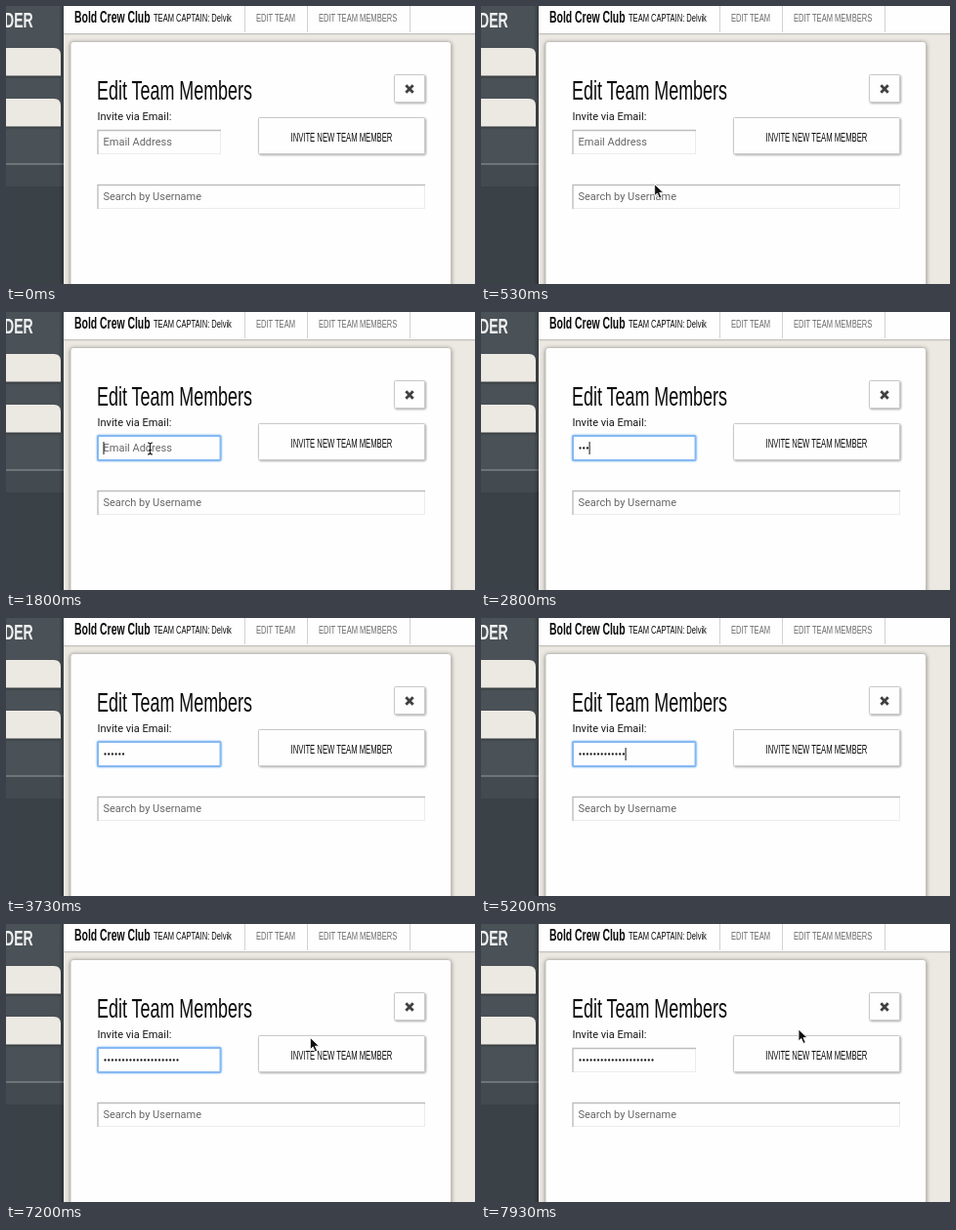
Write an HTML page that moves like this. It is 480 px wide and 285 px high and loops after 8000 ms.

```html
<!DOCTYPE html>
<html lang="en">
<head>
<meta charset="utf-8">
<title>Edit Team Members</title>
<style>
  html, body { margin: 0; width: 100%; height: 100%; overflow: hidden; background: #ece8e2; }
  svg { display: block; width: 100vw; height: 100vh; }
  text { font-family: Roboto, sans-serif; font-size: 11px; fill: #151515; white-space: pre; }
  .narrow text { font-family: "Liberation Sans", Arial, sans-serif; fill: #0c0c0c; }
  .narrow .nav { font-size: 11.8px; fill: #6c6c6c; }
  .hint { fill: #666; }
  .raised { fill: #fefefe; stroke: #c9c9c9; filter: drop-shadow(1px 1.5px 1px #0005); }
</style>
</head>
<body>
<svg viewBox="0 0 480 285">
  <defs>
    <linearGradient id="edge">
      <stop offset="0" stop-color="#0000"/>
      <stop offset="1" stop-color="#0004"/>
    </linearGradient>
  </defs>

  <!-- page and top bar -->
  <rect width="480" height="285" fill="#ece8e2"/>
  <rect x="59" y="-4" width="425" height="32" fill="#fefefe" style="filter:drop-shadow(0 .5px 1px #0008)"/>
  <path d="M244.5 0V27M308.5 0V27M413.5 0V27" stroke="#d2d2d2"/>

  <!-- sidebar -->
  <rect width="59" height="285" fill="#4a5257"/>
  <rect y="163" width="59" height="22" fill="#444b50"/>
  <rect y="185" width="59" height="100" fill="#3b4247"/>
  <path d="M0 162H59" stroke="#92989b"/>
  <rect x="54" width="5" height="285" fill="url(#edge)"/>
  <g fill="#ece8e2" style="filter:drop-shadow(0 1px 1px #0006)">
    <path d="M-2 43H49q7 0 7 7V71.5H-2z"/>
    <path d="M-2 95H49q7 0 7 7V123.5H-2z"/>
  </g>

  <!-- card -->
  <rect x="66" y="36.5" width="389.5" height="260" rx="3" fill="#fefefe" stroke="#c4c0ba"
        style="filter:drop-shadow(0 1px 2px #0006)"/>
  <rect class="raised" x="397.5" y="70.5" width="31" height="28" rx="1"/>
  <path d="M409.300 81.300l7.400 7.400m0-7.400l-7.400 7.400" stroke="#404040" stroke-width="2.800"/>
  <rect class="raised" x="258.5" y="114.5" width="170" height="37" rx="1"/>
  <g fill="#fefefe" stroke="#ececec">
    <rect x="94" y="127.5" width="125.5" height="24"/>
    <rect x="94" y="183.5" width="334.5" height="24"/>
  </g>
  <path d="M94 152V127.5H220M94 208V183.5H429" fill="none" stroke="#bdbdbd" stroke-width="1.300"/>

  <g class="narrow">
    <text transform="translate(-2 21.5) scale(.64 1)" style="font-size:22px;font-weight:bold;fill:#f1f1f1">DER</text>
    <text transform="translate(70 16.5) scale(.64 1)" style="font-size:16.300px;font-weight:bold">Bold Crew Club</text>
    <text transform="translate(151 16) scale(.64 1)" style="font-size:11.800px">TEAM CAPTAIN: Delvik</text>
    <text class="nav" transform="translate(256 15.500) scale(.64 1)">EDIT TEAM</text>
    <text class="nav" transform="translate(320 15.500) scale(.64 1)">EDIT TEAM MEMBERS</text>
    <text transform="translate(93 96.200) scale(.64 1)" style="font-size:28px">Edit Team Members</text>
    <text transform="translate(291.500 138.500) scale(.64 1)" style="font-size:12px">INVITE NEW TEAM MEMBER</text>
  </g>
  <text x="93.500" y="116.700">Invite via Email:</text>
  <text class="hint" x="99.500" y="199.200">Search by Username</text>

  <!-- email field state -->
  <rect id="focus" x="94" y="127" width="125.500" height="25" rx="1" fill="#fefefe" stroke="#84b9f2" stroke-width="2"
        style="filter:drop-shadow(0 0 1px #84b9f2)"/>
  <text id="hint" class="hint" x="99.500" y="143">Email Address</text>
  <path id="dots" stroke="#1c1c1c" stroke-width="2.300" stroke-linecap="round" stroke-dasharray="0 3.7"/>
  <path id="caret" stroke="#111" d="M0 133V146"/>

  <!-- pointer -->
  <g id="pointer">
    <circle id="ring" cx=".5" cy="1" r="16.500" fill="#fff4" stroke="#0a0a0a" stroke-width="2.200"/>
    <path id="arrow" d="M0 0V12l2.800-2.600 2.200 5 2.200-1-2.200-4.800H9z" fill="#111" stroke="#fff" stroke-width=".8"/>
    <path id="beam" d="M-2.500-5q2.500 0 2.500 2V5q0 2-2.500 2M2.500-5q-2.500 0-2.500 2M0 5q0 2 2.500 2M-1.500 2.500h3"
          fill="none" stroke="#222" stroke-width="1.100"/>
  </g>
</svg>
<script>
const LOOP = 8000, PITCH = 3.7;
const CLICK = 1470, TYPE_START = 2600, LEAVE = 6650, BLUR = 7500;
const typing = [[TYPE_START, 1], [3100, 6], [3870, 6], [5100, 13], [5300, 13], [6470, 21]];

const el = id => document.getElementById(id);
const show = (id, on) => el(id).style.display = on ? "" : "none";
const within = (t, a, b) => t >= a && t < b;
const ease = (t, a, b) => {
  const s = Math.min(1, Math.max(0, (t - a) / (b - a)));
  return s * s * (3 - 2 * s);
};
const bezier = (a, b, c, s) => (1 - s) ** 2 * a + 2 * s * (1 - s) * b + s * s * c;

function typedCount(t) {
  if (t < TYPE_START) return 0;
  for (let i = 1; i < typing.length; i++) {
    const [t0, n0] = typing[i - 1], [t1, n1] = typing[i];
    if (t < t1) return Math.floor(n0 + (n1 - n0) * (t - t0) / (t1 - t0));
  }
  return typing.at(-1)[1];
}

function pointerAt(t) {
  if (t < TYPE_START) {
    const s = ease(t, 0, 900);
    return [bezier(225, 190, 147.5, s), bezier(288, 190, 139, s)];
  }
  const s = ease(t, LEAVE, 7300);
  return [bezier(147.5, 215, 325, s), bezier(139, 180, 108, s)];
}

function draw(t) {
  const count = typedCount(t), focused = within(t, CLICK, BLUR);
  show("focus", focused);
  show("hint", count === 0);
  show("dots", count > 0);
  el("dots").setAttribute("d", `M101.5 139.5h${Math.max(0, count - 1) * PITCH + .1}`);

  const blinkedOff = within(t, 1970, 2470) || within(t, 3600, 3870) || within(t, 6970, 7470);
  show("caret", focused && !blinkedOff);
  el("caret").setAttribute("transform", `translate(${100 + count * PITCH})`);

  const [x, y] = pointerAt(t);
  const overField = within(t, CLICK, TYPE_START) || (t >= LEAVE && x < 220 && y < 152);
  show("pointer", t < TYPE_START || t >= LEAVE);
  el("pointer").setAttribute("transform", `translate(${x} ${y})`);
  show("ring", within(t, 1000, CLICK) || within(t, 7400, 7750));
  show("arrow", !overField);
  show("beam", overField);
}

const start = performance.now();
function tick() {
  draw((performance.now() - start) % LOOP);
  requestAnimationFrame(tick);
}
tick();
</script>
</body>
</html>
```
